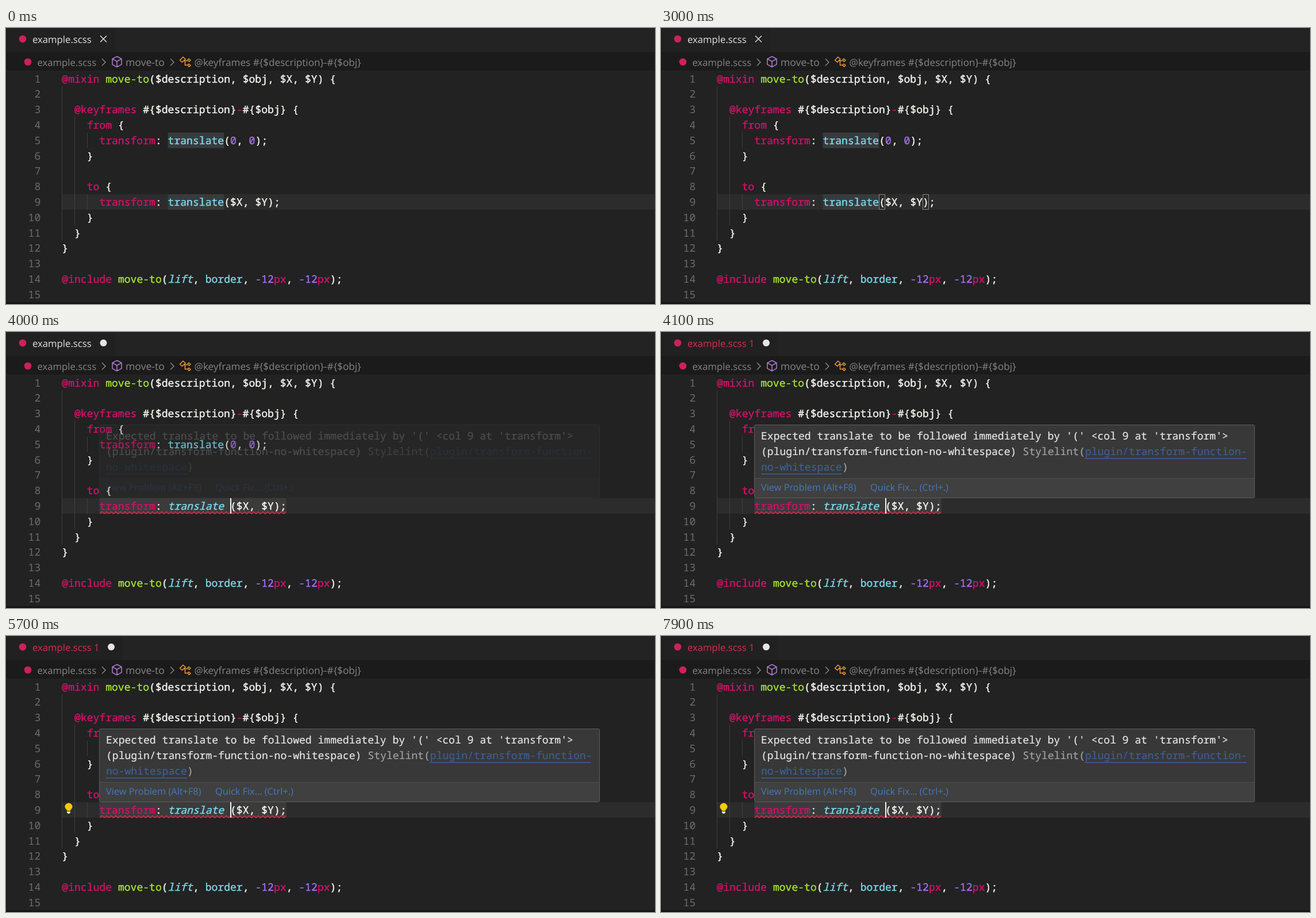
Write an HTML page that moves like this. It is 1129 by 480 pixels and loops after 8000 ms.

```html
<!DOCTYPE html>
<html lang="en">
<head>
<meta charset="utf-8">
<title>SCSS editor</title>
<style>
  html, body { margin: 0; width: 100%; height: 100%; overflow: hidden; background: #222; }
  svg { display: block; width: 1129px; height: 480px; }
  text { white-space: pre; text-rendering: geometricPrecision; fill: currentColor; }
  .mono { font: 500 18.07px "Noto Sans Mono", "DejaVu Sans Mono", monospace; color: #f6f6f0; }
  .mono text { stroke: currentColor; stroke-width: .4px; }
  .mono .no { stroke: none; }
  .hint { color: #e8e8e8; }
  .hint text { stroke-width: .2px; }
  .ui { font-family: "Open Sans", "Noto Sans", sans-serif; font-size: 16.7px; color: #858585; }
  .key { color: #d4106a; }
  .fn { color: #a6e52d; }
  .val { color: #7bdcee; }
  .ital { color: #7bdcee; font-style: italic; }
  .num { color: #a970ee; }
  .no { color: #6c6c6c; }
  .dim { color: #a2a2a2; }
  .link { color: #3d5f98; }
  .act { color: #4479bd; font-size: 16.35px; }
  .line { fill: none; stroke-width: 1.5; }
</style>
</head>
<body>
<svg id="stage" viewBox="0 0 1129 480">
  <rect width="1129" height="480" fill="#222"/>
  <rect width="1129" height="42" fill="#232323"/>
  <rect id="tab" width="190" height="42" fill="#212121"/>
  <rect y="42" width="1129" height="32" fill="#1b1b1b"/>
  <rect y="477" width="1129" height="3" fill="#171215"/>
  <rect width="1" height="480" fill="#141414"/>

  <circle cx="29" cy="19" r="6.3" fill="#cc2160"/>
  <text id="title" class="ui" x="46" y="26"></text>
  <path id="close" class="line" d="M164 13.5l11 11m0-11l-11 11" stroke="#dcdcdc"/>
  <circle id="dirty" cy="19" r="6" fill="#e6e6e6"/>

  <circle cx="38" cy="59" r="6.3" fill="#cc2160"/>
  <text class="ui" x="54.5" y="66">example.scss</text>
  <path class="line" d="M167 53.5l6 6-6 6M286 53.5l6 6-6 6" stroke="#858585"/>
  <path class="line" d="M193 49.5l8 4.2v9.6l-8 4.7-8-4.7v-9.6zM185 53.7l8 4.5 8-4.5M193 58.2V68" stroke="#b180d7"/>
  <text class="ui" x="208" y="66" style="font-size:17.6px">move-to</text>
  <path class="line" d="M302.5 56l5.5-5.5 4 3.5-5.5 5.5zM309.5 57h6M311.5 57v7.5h4M316 55.5l2-2 3 2.5-2.5 2.5zM316 64.5l2-2 3 2.5-2.5 2.5z" stroke="#e8973a"/>
  <text class="ui" x="327.5" y="66" style="font-size:17.15px">@keyframes #{$description}-#{$obj}</text>

  <rect x="97" y="289" width="1032" height="27" fill="#2c2c2c"/>
  <rect id="hovered" x="162.500" y="289" width="325" height="27" fill="#3b3b3b"/>
  <g id="words" fill="#383b3c"></g>
  <path d="M97.5 102V370M119.5 155V343M141.5 182V209M141.5 289V316" stroke="#3e3e3e"/>
  <g id="code" class="mono"></g>
  <g id="before" class="mono"></g>
  <g id="after" class="mono"></g>
  <g id="brackets" fill="none" stroke="#858585"></g>
  <path id="squiggle" fill="none" stroke="#dc2b4c" stroke-width="1.5"/>
  <g id="bulb">
    <path d="M106 304c0-2.5-3.5-3.5-3.5-7a6.5 6.5 0 0 1 13 0c0 3.5-3.5 4.5-3.5 7z" fill="#f6cb08"/>
    <path d="M106 305h6v2l-1.5 2h-3l-1.5-2z" fill="#d9d9d9"/>
  </g>
  <g id="hint">
    <rect x="162.5" y="161.5" width="870" height="127" rx="2" fill="#383838"/>
    <path d="M163 254.5H1032V288H163z" fill="#404040"/>
    <path d="M163 254.5H1032" stroke="#4e4e4e"/>
    <rect x="162.5" y="161.5" width="870" height="127" rx="2" fill="none" stroke="#5c5c5c"/>
    <g id="message" class="mono hint"></g>
    <path d="M737 220H1018M174 247H315" stroke="#3d5f98" stroke-width="1.3"/>
    <text class="ui act" x="174" y="276">View Problem (Alt+F8)</text>
    <text class="ui act" x="364" y="276">Quick Fix… (Ctrl+.)</text>
  </g>
  <rect id="caret" y="289" width="2" height="27" fill="#f4f4f4"/>
</svg>
<script>
const LOOP = 8000, TYPED = 3700, BLINK = 500;
const LEFT = 97.3, CHAR = 10.842, ROW = 26.8;
const SVG = "http://www.w3.org/2000/svg";
const $ = id => document.getElementById(id);
const colX = col => LEFT + col * CHAR;
const rowY = n => 94.6 + ROW * (n - 1);

function add(parent, tag, attrs, content) {
  const node = document.createElementNS(SVG, tag);
  for (const name in attrs) node.setAttribute(name, attrs[name]);
  if (content) node.textContent = content;
  return parent.appendChild(node);
}

// Runs are "text" or "class|text", placed one after another on the character grid.
function write(parent, x, y, runs) {
  for (const run of runs) {
    const [, style, str] = run.match(/^(?:(\w+)\|)?(.*)$/);
    add(parent, "text", { x, y, class: style || "" }, str);
    x += str.length * CHAR;
  }
}

const code = (parent, n, col, ...runs) => write(parent, colX(col), rowY(n), runs);

const main = $("code");
code(main, 1, 0, "key|@mixin", " ", "fn|move-to", "($description, $obj, $X, $Y) {");
code(main, 3, 2, "key|@keyframes", " #{$description}", "key|-", "#{$obj} {");
code(main, 4, 4, "key|from", " {");
code(main, 5, 6, "key|transform", ": ", "val|translate", "(", "num|0", ", ", "num|0", ");");
code(main, 6, 4, "}");
code(main, 8, 4, "key|to", " {");
code(main, 9, 6, "key|transform", ":");
code(main, 10, 4, "}");
code(main, 11, 2, "}");
code(main, 12, 0, "}");
code(main, 14, 0, "key|@include", " ", "fn|move-to", "(", "ital|lift", ", ", "val|border", ", ",
  "num|-12", "key|px", ", ", "num|-12", "key|px", ");");
for (let n = 1; n <= 15; n++)
  add(main, "text", { x: 60.3, y: rowY(n), class: "no", "text-anchor": "end" }, String(n));

code($("before"), 9, 17, "val|translate", "($X, $Y);");
code($("after"), 9, 17, "ital|translate", " ($X, $Y);");

for (const y of [182, 289])
  add($("words"), "rect", { x: colX(17), y, width: 9 * CHAR, height: 27 });
for (const col of [26, 33])
  add($("brackets"), "rect", { x: Math.round(colX(col)) + .5, y: 289.5, width: 10, height: 26 });

write($("message"), 174, 187, ["Expected translate to be followed immediately by '(' <col 9 at 'transform'>"]);
write($("message"), 174, 214, ["(plugin/transform-function-no-whitespace) ", "dim|Stylelint(", "link|plugin/transform-function-"]);
write($("message"), 174, 241, ["link|no-whitespace", "dim|)"]);

let wave = "M163 316";
for (let x = 167, up = true; x <= 488; x += 4, up = !up) wave += `L${x} ${up ? 312.5 : 316}`;
$("squiggle").setAttribute("d", wave);

const show = (id, on) => $(id).setAttribute("visibility", on ? "visible" : "hidden");
const between = (t, spans) => spans.some(([from, to]) => t >= from && t < to);

function draw(t) {
  const typed = t >= TYPED, failed = t >= 4100;
  show("before", !typed);
  show("words", !typed);
  show("after", typed);
  show("brackets", t >= 600 && !typed);
  show("squiggle", t >= 3900);
  show("hovered", t >= 3980);
  show("bulb", t >= 4300);

  show("close", !typed);
  show("dirty", typed);
  $("dirty").setAttribute("cx", failed ? 183 : 169.5);
  $("tab").setAttribute("width", failed ? 203 : 190);
  $("title").textContent = failed ? "example.scss 1" : "example.scss";
  $("title").style.color = failed ? "#d92c50" : "#e2e2e2";

  $("hint").setAttribute("opacity", Math.min(1, Math.max(0, (t - 3980) / 100)));
  $("caret").setAttribute("x", Math.round(colX(typed ? 27 : 26)));
  show("caret", typed
    ? Math.floor((t - TYPED) / BLINK) % 2 === 0
    : between(t, [[600, 1000], [1500, 2100], [2500, 3000], [3500, TYPED]]));
}

function tick() {
  draw(performance.now() % LOOP);
  requestAnimationFrame(tick);
}
tick();
</script>
</body>
</html>
```
